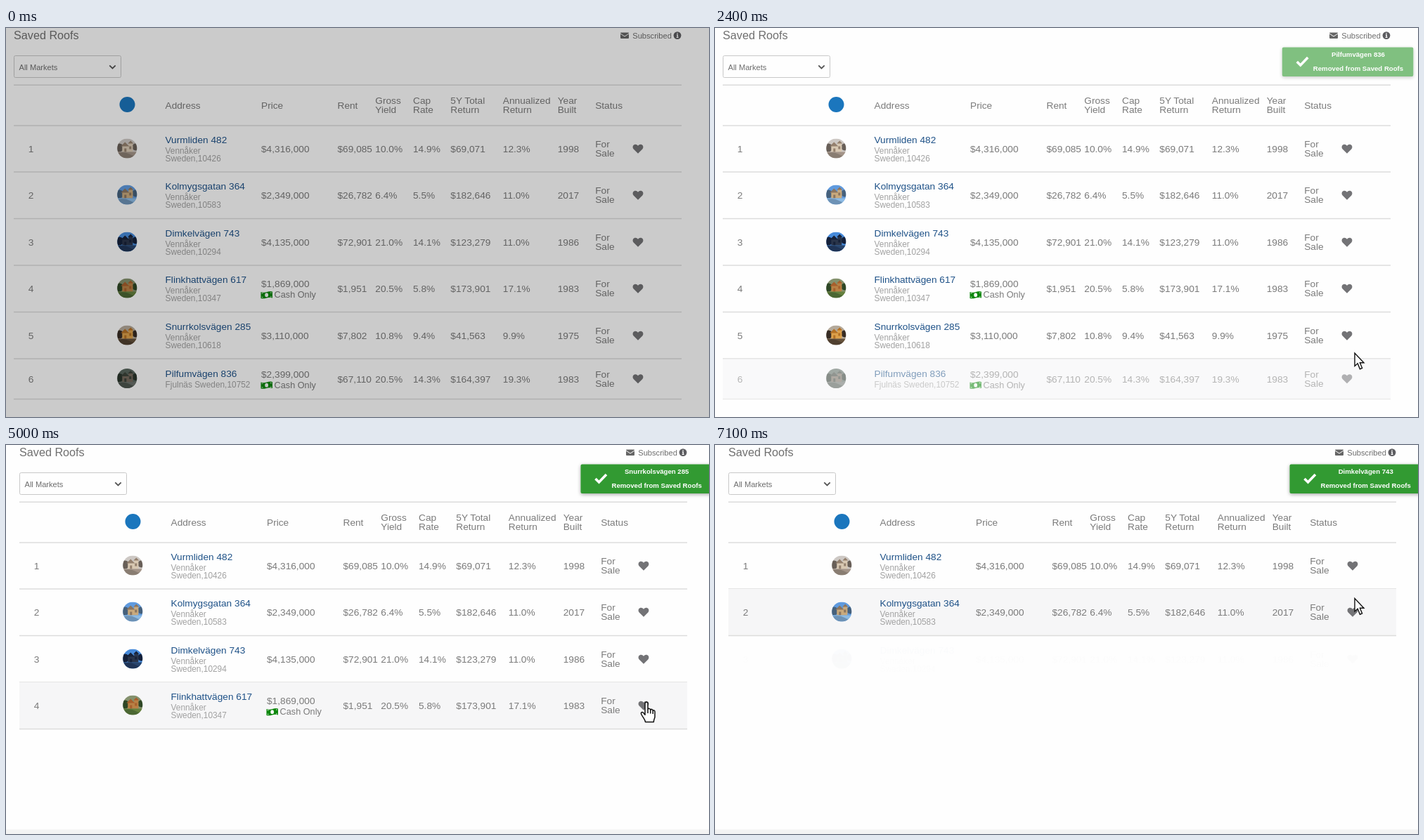
Animation of 1000 by 554 pixels, one loop 7200 ms. Source, as an HTML page:

```html
<!DOCTYPE html>
<html lang="en">
<head>
<meta charset="utf-8">
<title>Saved Roofs</title>
<style>
  html, body { margin: 0; width: 100%; height: 100%; overflow: hidden; background: #fefefe; }
  svg { display: block; width: 1000px; height: 554px; font-family: "Liberation Sans", Arial, sans-serif; font-size: 13.7px; }
  text { fill: #7b7b7b; white-space: pre; }
  .title { font-size: 16.2px; fill: #707070; }
  .small { font-size: 11.1px; fill: #6d6d6d; }
  .link { fill: #1f5288; }
  .sub { font-size: 11.9px; fill: #a2a2a2; }
  .cash { font-size: 12.7px; }
  .toast text { font-size: 9.65px; font-weight: bold; fill: #fff; text-anchor: middle; }
  .rule { stroke: #dcdcdc; stroke-width: 1.6; }
</style>
</head>
<body>
<svg id="stage" viewBox="0 0 1000 554"></svg>
<script>
const LOOP = 7200, UNDIM = 1580, SHIFT = 2880, TOAST_FADE = 360;
const COLS = [226.5, 363, 471.5, 525.3, 579, 632.3, 706.8, 784.7, 838.2];
const HEADS = ['Address', 'Price', 'Rent', 'Gross|Yield', 'Cap|Rate', '5Y Total|Return', 'Annualized|Return', 'Year|Built', 'Status'];
const EDGES = [139, 205, 271.5, 338, 404.5, 471, 528.5];
const MIDS = [172, 238, 305, 371, 438, 499.5];

// colours: sky, house, roof, ground, trees
const ROWS = [
  { name: 'Vurmliden 482', place: 'Vennåker|Sweden,10426', price: '$4,316,000',
    data: ['$69,085', '10.0%', '14.9%', '$69,071', '12.3%', '1998'],
    art: ['#cdc8c4', '#d8c8b2', '#94806e', '#a39488', '#685f58'] },
  { name: 'Kolmygsgatan 364', place: 'Vennåker|Sweden,10583', price: '$2,349,000',
    data: ['$26,782', '6.4%', '5.5%', '$182,646', '11.0%', '2017'],
    art: ['#5f9ade', '#c9aa7d', '#8b7560', '#8dbbe4', '#46617c'] },
  { name: 'Dimkelvägen 743', place: 'Vennåker|Sweden,10294', price: '$4,135,000',
    data: ['$72,901', '21.0%', '14.1%', '$123,279', '11.0%', '1986'],
    art: ['#468ada', '#2a354a', '#162138', '#28456d', '#14203a'] },
  { name: 'Flinkhattvägen 617', place: 'Vennåker|Sweden,10347', price: '$1,869,000', cash: true,
    data: ['$1,951', '20.5%', '5.8%', '$173,901', '17.1%', '1983'],
    art: ['#84916d', '#b98145', '#a75f2c', '#64803d', '#2e4726'] },
  { name: 'Snurrkolsvägen 285', place: 'Vennåker|Sweden,10618', price: '$3,110,000',
    data: ['$7,802', '10.8%', '9.4%', '$41,563', '9.9%', '1975'],
    art: ['#b4a99a', '#dda14b', '#b47125', '#65513b', '#372c24'] },
  { name: 'Pilfumvägen 836', place: 'Fjulnäs Sweden,10752', price: '$2,399,000', cash: true,
    data: ['$67,110', '20.5%', '14.3%', '$164,397', '19.3%', '1983'],
    art: ['#59665e', '#74695c', '#3c433a', '#6a706a', '#29342b'] }
];

// row index, start and end of its removal
const REMOVALS = [[5, 2180, 2680], [4, 3200, 3740], [3, 5300, 5820], [2, 6560, 7110]];

// time, x, y of the cursor tip
const PATH = [
  [1580, 914, 514], [1900, 903, 497], [2200, 903, 497], [2400, 910, 463], [2700, 909, 440],
  [3100, 908, 435], [3300, 908, 435], [3600, 909, 426], [4300, 911, 368], [5000, 911, 367],
  [5400, 911, 367], [5950, 916, 307], [6500, 916, 306], [6650, 915, 303], [6800, 912, 290],
  [7100, 910, 218.5], [7200, 910, 214]
];
const CROSS_PATH = [[400, 968, 570], [800, 928, 519], [1100, 922, 517], [1300, 922, 517], [1500, 914.5, 514.5]];

const clamp = v => Math.max(0, Math.min(1, v));
const text = (x, y, s, cls = '', extra = '') => `<text x="${x}" y="${y}" class="${cls}" ${extra}>${s}</text>`;
const rect = (x, y, w, h, fill, extra = '') => `<rect x="${x}" y="${y}" width="${w}" height="${h}" fill="${fill}" ${extra}/>`;
const rule = y => `<path class="rule" d="M11 ${y}H961"/>`;
const lines = (x, y, s, step, cls) => s.split('|').map((part, i) => text(x, y + i * step, part, cls)).join('');

function thumb(y, [sky, house, roof, ground, trees]) {
  return `<g transform="translate(172.3 ${y - .5})" clip-path="url(#round)">
    ${rect(-14, -14, 28, 28, sky)}
    <circle cx="-11" cy="-1" r="6" fill="${trees}"/><circle cx="12" cy="-2" r="5" fill="${trees}"/>
    ${rect(-7, -4, 15, 9, house)}${rect(2, -8, 6, 10, house)}
    <path d="M-9 -3L-3 -9L3 -3ZM1 -7L5 -11L9 -7Z" fill="${roof}"/>
    ${rect(-4, 0, 3, 5, roof)}${rect(3, -3, 3, 4, roof)}
    ${rect(-14, 5, 28, 9, ground)}
    <path d="M-14 7Q-4 4 3 8T14 10V14H-14Z" fill="${trees}" opacity=".45"/></g>`;
}

function banknote(y) {
  return `<g transform="translate(362.5 ${y})"><path d="M0 1.5Q4 3 8.5 1.5T16.5 1V10Q12.5 8.5 8 10T0 10.5Z" fill="#0d870d"/>
    <ellipse cx="8.2" cy="5.8" rx="2.4" ry="2.9" fill="#f4faf4"/>
    <path d="M1.2 3.3h1.8M13.5 2.6h1.8M1.2 9h1.8M13.5 8.5h1.8" stroke="#d9eed9"/></g>`;
}

function row(r, i) {
  const y = MIDS[i], top = EDGES[i], single = !r.place.includes('|');
  const nameY = single ? y - 2.5 : y - 8;
  const price = r.cash
    ? text(COLS[1], y - 2, r.price) + banknote(y + 3.4) + text(381.6, y + 13.3, 'Cash Only', 'cash')
    : text(COLS[1], y + 5, r.price);
  return `<g id="row${i}">${rect(11, top, 950, EDGES[i + 1] - top, '#f6f6f7', `id="hover${i}"`)}
    ${text(35.5, y + 5, i + 1, '', 'text-anchor="middle"')}
    ${thumb(y, r.art)}
    ${text(COLS[0], nameY, r.name, 'link')}
    ${lines(COLS[0], single ? y + 12.5 : y + 7, r.place, 11, 'sub')}
    ${price}
    ${r.data.map((d, k) => text(COLS[k + 2], y + 5, d)).join('')}
    ${lines(COLS[8], y - 1.6, 'For|Sale', 12.8)}
    <path transform="translate(899 ${y})" fill="#737376" d="M0 6.8L-6.3 .5C-8.2 -1.6 -7.5 -5 -5 -5.9C-3 -6.6 -1.2 -5.7 0 -4.2C1.2 -5.7 3 -6.6 5 -5.9C7.5 -5 8.2 -1.6 6.3 .5Z"/>
    ${rule(EDGES[i + 1])}</g>`;
}

const toast = ([i], k) => `<g id="toast${k}" class="toast">
    ${rect(817.5, 27.5, 186.5, 41.5, '#339a33', 'rx="2" filter="url(#shadow)"')}
    <path d="M838.5 48L843.5 53L854 42" fill="none" stroke="#fff" stroke-width="3.6"/>
    ${text(925.7, 41.2, ROWS[i].name)}
    ${text(925.7, 61.3, 'Removed from Saved Roofs')}</g>`;

const header = HEADS.map((h, k) =>
  h.includes('|') ? lines(COLS[k], 108, h, 12.9) : text(COLS[k], 115, h)).join('');

const stage = document.getElementById('stage');
stage.innerHTML = `
  <defs><clipPath id="round"><circle r="14"/></clipPath>
    <filter id="shadow" x="-10%" y="-30%" width="120%" height="170%">
      <feDropShadow dx="0" dy="1.5" stdDeviation="2.5" flood-color="#000" flood-opacity=".35"/></filter></defs>
  ${rect(0, 0, 1000, 554, '#fefefe')}
  ${rect(0, 547.5, 1000, 7, '#f3f3f3', 'id="footer"')}
  <g id="page">
    ${text(11, 16.2, 'Saved Roofs', 'title')}
    ${rect(874, 6.5, 12, 8.5, '#666', 'rx="1"')}
    <path d="M874 8L880 12L886 8" fill="none" stroke="#fefefe"/>
    ${text(891.3, 14.5, 'Subscribed', 'small')}
    <circle cx="955" cy="10.6" r="5.4" fill="#5c5c60"/>
    <path d="M955 7v1.6M954 10h1.2v3.2M953.7 13.4h2.8" fill="none" stroke="#fff" stroke-width="1.3"/>
    ${rect(11.5, 39.5, 152, 31, '#fefefe', 'rx="2" stroke="#c8c8c8"')}
    ${text(18.5, 59.7, 'All Markets', 'small')}
    <path d="M147.3 53.3L151.5 57.5L155.7 53.3" fill="none" stroke="#555" stroke-width="1.8"/>
    ${rule(81.3)}${rule(EDGES[0])}
    <circle cx="172.5" cy="109" r="11" fill="#1b76bd"/>
    ${header}
    ${ROWS.map(row).join('')}
  </g>
  <g id="toasts">${REMOVALS.map(toast).join('')}</g>
  ${rect(0, 0, 1000, 554, '#000', 'id="dim" opacity=".2"')}
  <path id="cross" d="M-11 0H11M0 -11V11" stroke="#000" stroke-width="2"/>
  <path id="arrow" d="M0 0V18.5L4.2 14.8L7.4 22.8L10.6 21.4L7.4 13.8H13Z" fill="#fff" stroke="#111" stroke-width="1.4"/>
  <path id="hand" d="M-2 1C-2 -1.5 2 -1.5 2 1V10C2.5 7.5 5.5 8 5.7 10.5C6.5 8.5 9 9.5 9.2 11.5C10.5 10 12 11.3 12 13V20C12 22.5 10.3 23.5 10.3 27.5H-1.5C-1.5 24.5 -4 22.5 -7 17C-9 13.5 -5.5 12.5 -3.8 15L-2 17.3ZM2 10V15M5.7 10.5V15.5M9.2 11.5V16" fill="#fff" stroke="#111" stroke-width="1.5" stroke-linejoin="round"/>`;

const el = id => document.getElementById(id);
const show = (id, on) => el(id).setAttribute('visibility', on ? 'visible' : 'hidden');
const alpha = (id, v) => el(id).setAttribute('opacity', v);
const move = (id, x, y) => el(id).setAttribute('transform', `translate(${x} ${y})`);

function along(path, t) {
  let k = 1;
  while (k < path.length - 1 && t > path[k][0]) k++;
  const [t0, x0, y0] = path[k - 1], [t1, x1, y1] = path[k];
  const u = clamp((t - t0) / (t1 - t0));
  return [x0 + (x1 - x0) * u, y0 + (y1 - y0) * u];
}

function draw(t) {
  const dim = t < UNDIM, shifted = t >= SHIFT;
  show('dim', dim);
  show('footer', shifted);
  move('page', shifted ? 8 : 0, 0);
  move('toasts', shifted ? 0 : -10.7, 0);

  const [x, y] = along(PATH, t);
  const hoverY = along(PATH, t - 80)[1];
  const heartX = shifted ? 907 : 899;
  let overHeart = false;
  ROWS.forEach((r, i) => {
    const gone = REMOVALS.find(m => m[0] === i);
    const left = gone ? 1 - clamp((t - gone[1]) / (gone[2] - gone[1])) : 1;
    alpha('row' + i, left);
    alpha('hover' + i, !dim && hoverY >= EDGES[i] && hoverY < EDGES[i + 1] ? 1 : 0);
    if (left > .1 && Math.abs(x - heartX) < 12 && Math.abs(y - MIDS[i]) < 9) overHeart = true;
  });

  // each toast fades in over the one before and then replaces it
  REMOVALS.forEach((m, k) => {
    const next = REMOVALS[k + 1];
    const replaced = next && t >= next[1] + TOAST_FADE;
    alpha('toast' + k, replaced ? 0 : clamp((t - m[1]) / TOAST_FADE));
  });

  show('cross', dim && t >= CROSS_PATH[0][0]);
  move('cross', ...along(CROSS_PATH, t));
  show('hand', !dim && overHeart);
  show('arrow', !dim && !overHeart);
  move('hand', x, y);
  move('arrow', x, y);
}

const start = performance.now();
function tick() {
  draw((performance.now() - start) % LOOP);
  requestAnimationFrame(tick);
}
tick();
</script>
</body>
</html>
```
